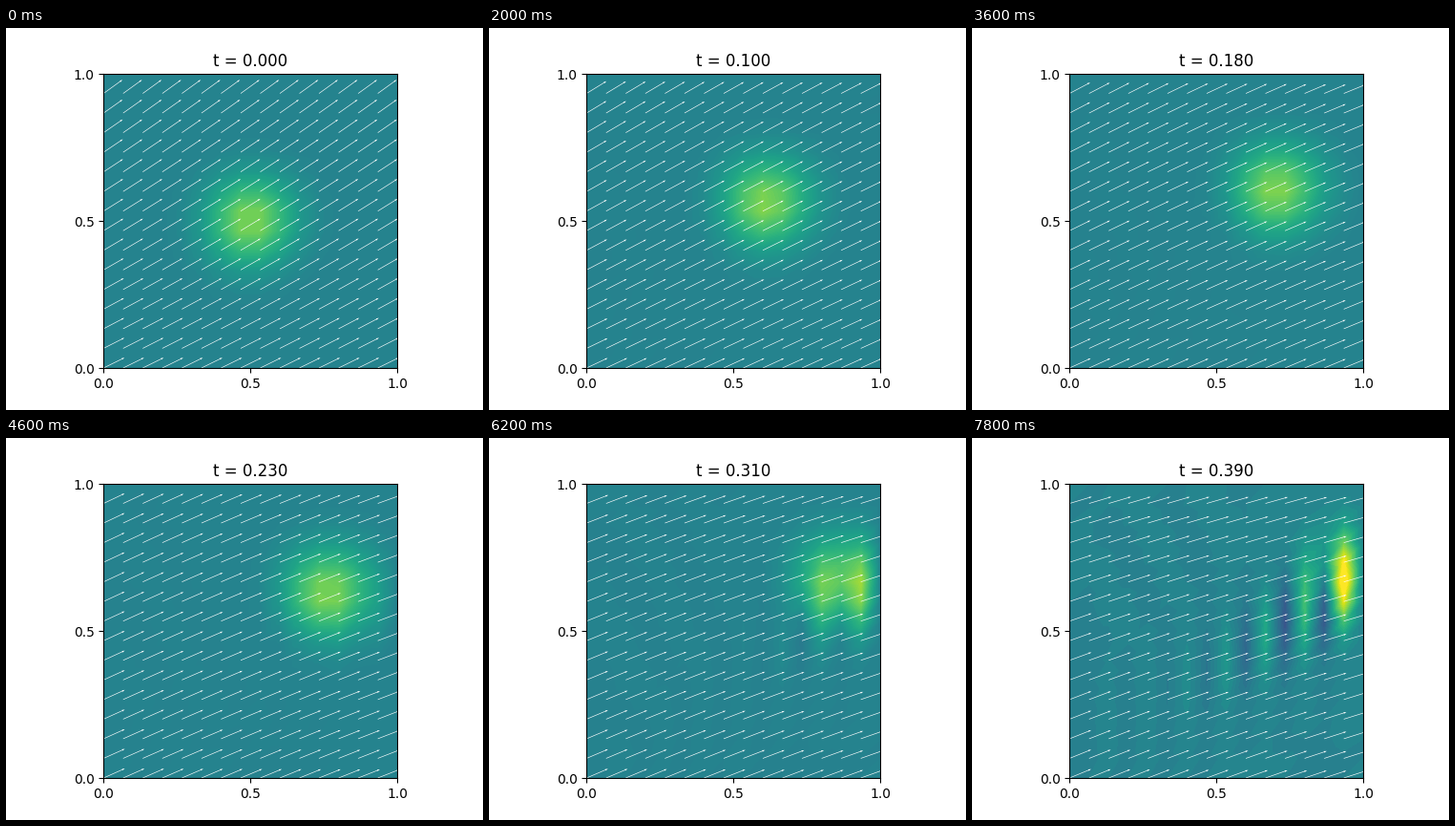
A matplotlib script that plays this animation: 500x400 px, repeating every 8 s.

```python
import numpy as np
import matplotlib.pyplot as plt
from matplotlib.animation import FuncAnimation
from matplotlib.tri import Triangulation

N = 15            # cells per side
FRAMES = 40
DT = 0.01
VMIN, VMAX = -1.15, 1.45

# Unit square split into right-diagonal triangles
grid = np.linspace(0, 1, N + 1)
X, Y = (a.ravel() for a in np.meshgrid(grid, grid))
corner = (np.arange(N)[:, None] * (N + 1) + np.arange(N)).ravel()
right, up, diag = corner + 1, corner + N + 1, corner + N + 2
cells = np.vstack([np.column_stack([corner, right, diag]),
                   np.column_stack([corner, diag, up])])
mesh = Triangulation(X, Y, cells)
edge = (X < 1e-9) | (X > 1 - 1e-9) | (Y < 1e-9) | (Y > 1 - 1e-9)


def flow(t):
    """Unit wind vectors at the nodes, turning flatter with time."""
    bottom = 0.49 - (0.2 + 0.25 * X) * t
    top = (1 - X) * (0.74 - 1.15 * t) + X * (0.22 + 0.52 * np.exp(-6 * t))
    angle = np.arctan((1 - Y) * bottom + Y * top)
    return np.cos(angle), np.sin(angle)


def speed(t):
    return 1.27 + 0.35 * t


# Linear elements: shape gradients, areas and the mass matrix
px, py = X[cells], Y[cells]
gx = np.roll(py, -1, axis=1) - np.roll(py, -2, axis=1)
gy = np.roll(px, -2, axis=1) - np.roll(px, -1, axis=1)
twice = np.sum(px * gx, axis=1)
gx, gy = gx / twice[:, None], gy / twice[:, None]
area = np.abs(twice) / 2
rows = np.repeat(cells, 3, axis=1)
cols = np.tile(cells, (1, 3))


def assemble(local):
    matrix = np.zeros((X.size, X.size))
    np.add.at(matrix, (rows, cols), local.reshape(len(cells), 9))
    return matrix


weights = (np.ones((3, 3)) + np.eye(3)) / 12
mass = assemble(area[:, None, None] * weights)


def advection(t):
    u, v = (speed(t) * w[cells] for w in flow(t))
    wu = area[:, None] * (u @ weights)
    wv = area[:, None] * (v @ weights)
    return assemble(wu[:, :, None] * gx[:, None, :]
                    + wv[:, :, None] * gy[:, None, :])


def solve():
    """Crank-Nicolson transport with zero values on the border."""
    c = np.exp(-50 * ((X - 0.5)**2 + (Y - 0.5)**2))
    states = [c]
    for i in range(FRAMES - 1):
        half = DT / 2 * advection((i + 0.5) * DT)
        lhs = mass + half
        rhs = (mass - half) @ c
        lhs[edge] = np.eye(X.size)[edge]
        rhs[edge] = 0
        c = np.linalg.solve(lhs, rhs)
        states.append(c)
    return states


states = solve()
fig, ax = plt.subplots(figsize=(5, 4), dpi=100)


def draw(i):
    t = i * DT
    ax.clear()
    ax.set_aspect("equal")
    ax.tricontourf(mesh, states[i], 40, cmap="viridis", vmin=VMIN, vmax=VMAX)
    ax.quiver(X, Y, *flow(t), color="white", scale=12.6, width=0.002)
    ax.set(xlim=(0, 1), ylim=(0, 1), xticks=[0, 0.5, 1], yticks=[0, 0.5, 1])
    ax.set_title(f"t = {t:.3f}")
    return []


anim = FuncAnimation(fig, draw, frames=FRAMES, interval=200,
                     init_func=lambda: draw(0), repeat=True, repeat_delay=0)
plt.show()
```
